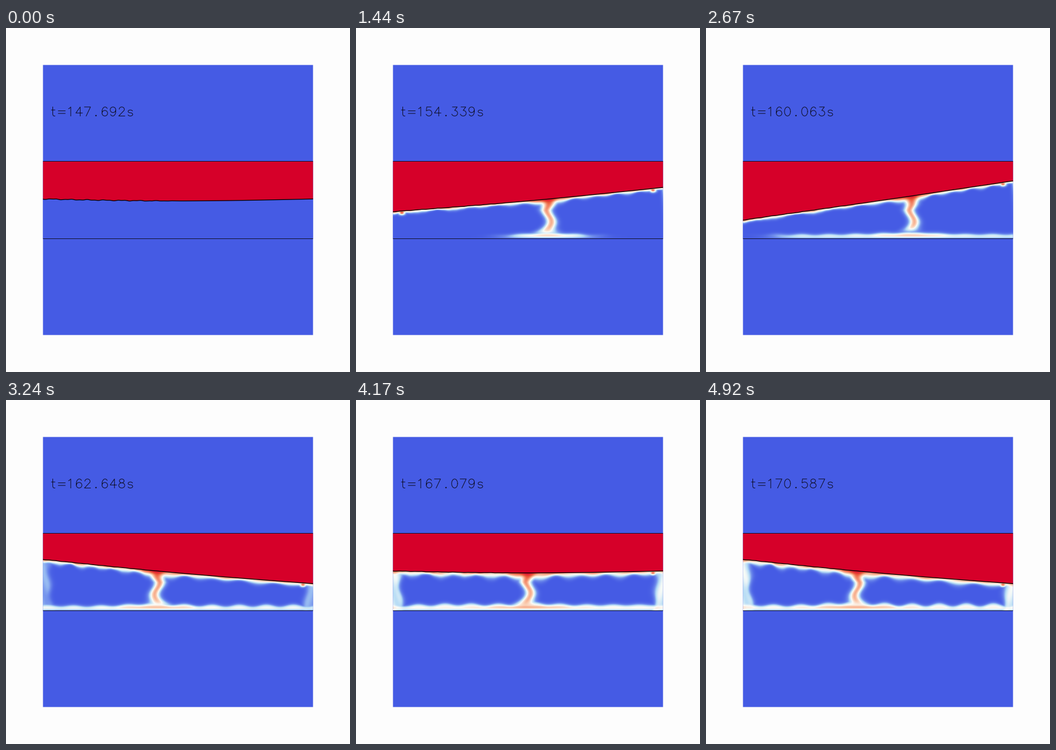
A matplotlib script that plays this animation: 600 px wide and 600 px high, repeating every 4.95 s.

```python
import numpy as np
import matplotlib.pyplot as plt
from matplotlib.animation import FuncAnimation
from matplotlib.patches import Rectangle

SIZE, DPI = 600, 100
LEFT, RIGHT, TOP, BOTTOM = 64.5, 535.5, 64.5, 535.5
LID, FLOOR = 233, 367
MID, HALF = 300, 235.5
SLOTS, TICK = 165, 30
PERIOD = 10          # simulation steps per sloshing cycle
PX = 72 / DPI        # one pixel in points

STOPS = [0, .14, .28, .45, .6, .8, 1]
RED = [69, 112, 178, 252, 250, 236, 214]
GREEN = [91, 142, 218, 253, 200, 92, 0]
BLUE = [228, 236, 245, 248, 170, 60, 41]

x = np.arange(64, 536) + .5
X, Y = np.meshgrid(x, np.arange(LID, FLOOR) + .5)
u = (x - MID) / HALF


def sigmoid(z):
    return 1 / (1 + np.exp(-np.clip(z, -40, 40)))


def ramp(k, start, length):
    t = np.clip((k - start) / length, 0, 1)
    return t * t * (3 - 2 * t)


def blob(cx, cy, rx, ry):
    return np.exp(-((X - cx) / rx) ** 2 - ((Y - cy) / ry) ** 2)


# ---- stroke lettering: y runs up from the baseline, cap height 21 ----
def arc(cx, cy, rx, ry, a, b):
    t = np.radians(np.linspace(a, b, 17))
    return list(zip(cx + rx * np.cos(t), cy + ry * np.sin(t)))


GAP = [(np.nan, np.nan)]
SIX = arc(1, 10, 7, 11, 45, 180) + arc(.5, 6.5, 6.5, 6.5, 180, 540)
GLYPHS = {
    '0': arc(0, 10.5, 7, 10.5, 0, 360),
    '1': [(-4, 17), (-2, 18), (1, 21), (1, 0)],
    '2': arc(0, 15.5, 6, 5.5, 175, -30) + [(-7, 0), (7, 0)],
    '3': [(-5, 21), (6, 21), (0, 13)] + arc(0, 6.5, 7, 6.5, 90, -160),
    '4': [(3, 0), (3, 21), (-7, 7), (8, 7)],
    '5': [(5, 21), (-5, 21), (-6, 12)] + arc(0, 7, 7, 7, 125, -155),
    '6': SIX,
    '7': [(-7, 21), (7, 21), (-3, 0)],
    '8': arc(0, 16.5, 5.5, 4.5, -90, 270) + GAP + arc(0, 6, 7, 6, 90, -270),
    '9': [(-a, 21 - b) for a, b in SIX],
    '.': [(-1, 1), (0, 2), (1, 1), (0, 0), (-1, 1)],
    '=': [(-8, 12), (8, 12)] + GAP + [(-8, 6), (8, 6)],
    't': [(-1, 21), (-1, 4), (0, 1), (2, 0), (4, 0)] + GAP + [(-4, 14), (4, 14)],
    's': arc(0, 10.75, 5.2, 3.25, 20, 260) + arc(0, 3.75, 5.5, 3.75, 80, -160),
}


def lettering(text, x0=82.3, base=153.5, advance=14.95, scale=.75):
    points = []
    for i, ch in enumerate(text):
        points += [(x0 + advance * i + scale * a, base - scale * b)
                   for a, b in GLYPHS[ch]] + GAP
    return np.array(points).T


# ---- the sloshing layer ----
def surface(k):
    s = np.sin(2 * np.pi * k / PERIOD)
    rough = .45 * np.sin(.21 * x) + .3 * np.sin(.47 * x + 1)
    rough *= sigmoid((270 - x) / 15) * (.4 + .6 * np.exp(-k / 8))
    bow = 3.4 * np.cos(np.pi * u / 2)
    return 298.2 + bow + 36 * s * u + 3 * (s * u) ** 2 + rough


def interface_layer(k, d, px):
    grow = 1 - np.exp(-k / 6)
    late = ramp(k, 60, 40)
    xs = X - (px - MID) * np.cos(np.pi * (X - MID) / (2 * HALF))
    bump = np.sin(.14 * xs) + .6 * np.sin(.083 * xs + 1)
    near = np.exp(-((xs - MID) / 38) ** 2)
    depth = grow * (4 + (.9 + .7 * late) * bump + 4 * near + 2.4 * late)
    warm = .64 + .08 * np.sin(.09 * xs + 2) + .1 * near
    return grow * warm * np.exp(-(d / np.maximum(depth, .6)) ** 2)


def plume(k, d, px, top):
    phase = 2 * np.pi * k / PERIOD
    crest = 328 - 10 * np.tanh(4 * np.sin(phase + .35))
    sway = 4.5 * np.cos(2 * np.pi * (Y - crest) / 44)
    centre = px + sway * np.clip((Y - 306) / 12, 0, 1)
    tip = top + min(46 * (k / 20) ** .8, 60)
    reached = ramp(k, 18, 16)
    width = (9 + 18 * np.exp(-np.maximum(d, 0) / 6)
             + 14 * reached * np.exp(-(FLOOR - 10 - Y).clip(0) / 5))
    heat = .64 + .28 * np.exp(-np.maximum(d, 0) / 11)
    heat *= 1 - .5 * (1 - reached) * np.clip((Y - top) / 45, 0, 1)
    start = 1 - np.exp(-k / 4)
    return start * heat * sigmoid((tip - Y) / 3) * np.exp(-((X - centre) / width) ** 2)


def floor_layer(k, px):
    h = FLOOR - Y
    r = np.abs(X - px)
    reach = 20 + 5.2 * (k - 26)
    rise = ramp(k, 45, 65)
    scallop = np.sin(.135 * r + .8) + .6 * np.sin(.08 * X + .05 * r)
    height = 6 + 3.5 * np.exp(-(r / 50) ** 2) + 3.5 * rise
    height += (.5 + 1.3 * rise) * scallop
    core = np.exp(-((h - 5.5) / 3.5) ** 2)
    heat = .43 + core * (.16 * np.exp(-(r / 75) ** 2) + .06 * rise)
    shade = 1 - (1 - .35 * rise) * np.exp(-h / 1.5)
    band = sigmoid((height - h) / 1.6) * shade
    return ramp(k, 23, 9) * heat * band * sigmoid((reach - r) / 14)


def walls(k, d, yi):
    grow = 1 - np.exp(-k / 6)
    late = ramp(k, 68, 25)
    a, b = X - LEFT, RIGHT - X
    phase = 2 * np.pi * k / PERIOD
    left_drop = blob(80, np.interp(80, x, yi) + 3, 6, 4)
    right_drop = blob(518, np.interp(518, x, yi) + 3, 6, 4)
    parts = [
        .8 * grow * (1 - ramp(k, 52, 12)) * left_drop,
        .75 * grow * right_drop,
        .4 * grow * np.exp(-b / 2 - np.maximum(d, 0) / 18),
    ]
    corner = 8 * np.exp(-(FLOOR - Y) / 14) + 7 * np.exp(-np.maximum(d, 0) / 8)
    for dist, shift in ((a, 0), (b, 2)):
        width = 12 + corner + 2.5 * np.sin(.14 * Y + phase + shift)
        core = .37 + .07 * np.sin(.25 * dist - .08 * Y + shift)
        parts.append(late * core * sigmoid((width - dist) / 2.5))
    return parts


def picture(k):
    yi = surface(k)
    d = Y - yi
    px = MID - 62 * np.sin(2 * np.pi * k / PERIOD)
    top = np.interp(px, x, yi)
    parts = [interface_layer(k, d, px), plume(k, d, px, top), floor_layer(k, px)]
    parts += walls(k, d, yi)
    value = np.clip(sum(p ** 4 for p in parts) ** .25, 0, .95)
    cover = np.clip(.5 - d, 0, 1)
    rgba = [np.interp(value, STOPS, c) * (1 - cover) + c[-1] * cover
            for c in (RED, GREEN, BLUE)]
    rgba.append(np.full(X.shape, 255))
    rgba[3][:, [0, -1]] = 128     # side columns are half covered
    return np.dstack(rgba).astype(np.uint8), yi


# 30 fps playback of 25 fps material, snapped to 30 ms ticks
starts = np.array([0] + [n + (n + 16) // 10 for n in range(1, 149)])


def step_at(slot):
    n = int(np.searchsorted(starts, slot, side='right')) - 1
    return -(-5 * n // 6)


fig = plt.figure(figsize=(SIZE / DPI, SIZE / DPI), dpi=DPI, facecolor='#fdfdfd')
ax = fig.add_axes([0, 0, 1, 1])
ax.set_axis_off()
ax.add_patch(Rectangle((LEFT, TOP), RIGHT - LEFT, BOTTOM - TOP,
                       facecolor='#455be4', edgecolor='none', snap=False))
image = ax.imshow(picture(0)[0], extent=(64, 536, FLOOR, LID),
                  interpolation='nearest', zorder=1)
for level in (LID - .5, FLOOR + .5):
    ax.plot([LEFT, RIGHT], [level, level], color='#12122c', lw=PX,
            solid_capstyle='butt', snap=False)
edge, = ax.plot([], [], color='black', lw=1.3 * PX, solid_capstyle='butt')
clock, = ax.plot([], [], color='#0c0c20', lw=PX, snap=False)
ax.set_xlim(0, SIZE)
ax.set_ylim(SIZE, 0)
ax.set_aspect('auto')


def draw(slot):
    k = step_at(slot)
    pixels, yi = picture(k)
    image.set_data(pixels)
    edge.set_data(x, yi)
    clock.set_data(*lettering(f't={147.692 + .18464 * k:.3f}s'))
    return image, edge, clock


anim = FuncAnimation(fig, draw, frames=SLOTS, interval=TICK, repeat=True,
                     repeat_delay=0, blit=False)
plt.show()
```
